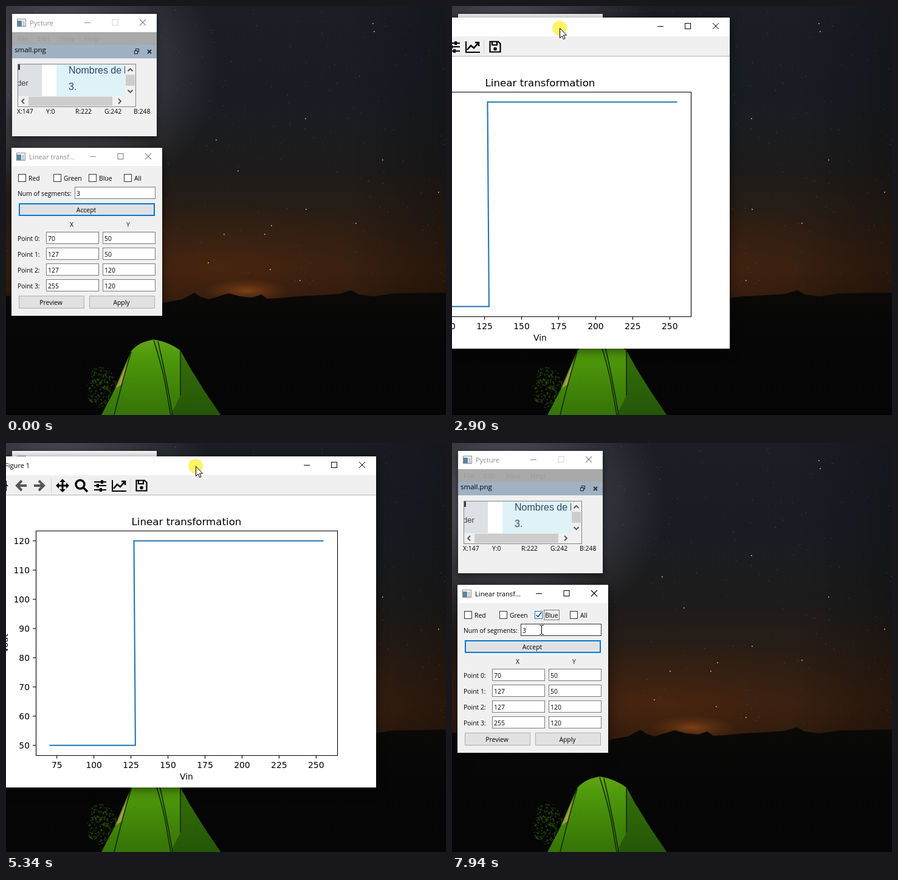
These frames come from a looping animation (724x672 px, 8 s). An HTML page with a canvas:

```html
<!DOCTYPE html>
<html lang="en">
<head>
<meta charset="utf-8">
<title>Linear transformation</title>
<style>
html, body { margin: 0; width: 100%; height: 100%; overflow: hidden; background: #060606; }
canvas { display: block; }
</style>
</head>
<body>
<canvas id="stage" width="724" height="672"></canvas>
<script>
const LOOP = 8000;
const stage = document.getElementById('stage').getContext('2d');
let c = stage;

// ---------- helpers ----------
const ramp = (t, a, b) => Math.min(1, Math.max(0, (t - a) / (b - a)));
const within = (t, a, b) => t >= a && t < b;

function layer(w, h, draw) {
  const canvas = document.createElement('canvas');
  canvas.width = w;
  canvas.height = h;
  c = canvas.getContext('2d');
  draw();
  c = stage;
  return canvas;
}

function rect(x, y, w, h, fill) {
  c.fillStyle = fill;
  c.fillRect(x, y, w, h);
}

function box(x, y, w, h, fill, edge, lw = 1) {
  rect(x, y, w, h, edge);
  rect(x + lw, y + lw, w - 2 * lw, h - 2 * lw, fill);
}

function text(s, x, y, size = 10.4, color = '#000', align = 'left', font = '"Open Sans"') {
  c.font = `${size}px ${font}, sans-serif`;
  c.fillStyle = color;
  c.textAlign = align;
  c.fillText(s, x, y);
}

function path(d, x, y, { fill, stroke, lw = 1 }) {
  const p = new Path2D(d);
  c.save();
  c.translate(x, y);
  if (fill) { c.fillStyle = fill; c.fill(p); }
  if (stroke) { c.strokeStyle = stroke; c.lineWidth = lw; c.stroke(p); }
  c.restore();
}

function dot(x, y, r, fill) {
  c.fillStyle = fill;
  c.beginPath();
  c.arc(x, y, r, 0, 7);
  c.fill();
}

function shadowed(x, y, w, h, blur) {
  c.save();
  c.shadowColor = 'rgba(0,0,0,.6)';
  c.shadowBlur = blur;
  c.shadowOffsetY = 3;
  rect(x, y, w, h, '#f0f0f0');
  c.restore();
}

// ---------- night photo ----------
let seed = 11;
const rnd = () => (seed = (seed * 16807) % 2147483647) / 2147483647;

function linear(x0, y0, x1, y1, ...stops) {
  const g = c.createLinearGradient(x0, y0, x1, y1);
  stops.forEach(([at, color]) => g.addColorStop(at, color));
  return g;
}

function glow(x, y, rx, ry, rgb, alpha) {
  c.save();
  c.translate(x, y);
  c.scale(rx, ry);
  const g = c.createRadialGradient(0, 0, 0, 0, 0, 1);
  g.addColorStop(0, `rgba(${rgb},${alpha})`);
  g.addColorStop(0.5, `rgba(${rgb},${alpha * 0.4})`);
  g.addColorStop(1, `rgba(${rgb},0)`);
  rect(-1, -1, 2, 2, g);
  c.restore();
}

const photo = layer(724, 672, () => {
  rect(0, 0, 724, 672, linear(0, 0, 0, 490, [0, '#1b1e25'], [0.3, '#191d23'], [0.56, '#1e1c1b'],
    [0.72, '#2a1d14'], [0.88, '#351e10'], [1, '#2c190d']));
  glow(90, 100, 260, 230, '135,128,140', 0.75);
  glow(350, 430, 330, 110, '100,48,14', 0.4);
  glow(396, 468, 70, 20, '165,82,26', 0.6);
  rect(560, 0, 164, 480, linear(560, 0, 724, 0, [0, 'rgba(0,0,0,0)'], [1, 'rgba(0,0,0,.25)']));

  for (let i = 0; i < 330; i++) {
    const y = rnd() * 460;
    rect(rnd() * 724, y, 1, 1, `rgba(190,195,205,${0.1 + rnd() * 0.35})`);
  }
  [[605, 41], [603, 28], [345, 219], [381, 270], [493, 333], [436, 360], [425, 374], [332, 421],
   [711, 305], [483, 450], [575, 356], [619, 252], [358, 374], [492, 184], [434, 432]]
    .forEach(([x, y]) => rect(x, y, 1.6, 2, 'rgba(225,215,200,.75)'));

  path(`M0 476L257 488L290 482L310 471L320 478L334 482L350 477L366 472L385 477L405 479L420 474
    L430 481L450 480L480 477L520 475L548 473L568 467L580 474L605 477L640 472L724 471V672H0Z`,
    0, 0, { fill: linear(0, 470, 0, 672, [0, '#0a0908'], [0.4, '#060606'], [1, '#040504']) });

  for (let i = 0; i < 230; i++) {
    const a = rnd() * 7, r = Math.sqrt(rnd());
    dot(157 + Math.cos(a) * r * 25, 626 + Math.sin(a) * r * 34, 0.6 + rnd(),
      `rgba(${30 + rnd() * 30},${60 + rnd() * 55},14,.6)`);
  }

  const shell = 'M157 672L178 632L190 603L206 567Q218 552 243 548Q268 552 287 566L301 592L326 632L353 672Z';
  path(shell, 0, 0, { fill: linear(0, 548, 0, 672, [0, '#62a514'], [0.25, '#4d980b'], [1, '#357307']) });
  path('M287 566L301 592L326 632L353 672H271L287 640Z', 0, 0,
    { fill: linear(0, 566, 0, 672, [0, '#35700a'], [1, '#245607']) });
  path('M204 575L181 628L192 620Z', 0, 0, { fill: '#a99a48' });
  path('M243 549Q256 590 262 620L271 672M250 551Q264 610 274 672M206 568Q193 610 178 672M287 566V640', 0, 0,
    { stroke: '#142a06', lw: 1.6 });
});

// ---------- plot window ----------
const FIG_W = 640, FIG_H = 544;
const px = v => 80 + (v - 60.75) * 496 / 203.5;
const py = v => 491.6 - (v - 46.5) * 4.8;
const CROSS = 'M-5-5L5 5M5-5L-5 5';

const figure = layer(FIG_W, FIG_H, () => {
  rect(0, 0, FIG_W, FIG_H, '#fff');
  rect(0, 31, FIG_W, 32, '#f0f0f0');
  rect(0, 63, FIG_W, 1, '#b4b4b4');
  dot(15, 15, 7, '#c2beb0');
  text('Figure 1', 29, 19, 11.1);
  rect(521, 14, 10, 1, '#000');
  box(566, 9, 10, 10, '#fff', '#000');
  path(CROSS, 617, 14, { stroke: '#000' });

  const ink = '#000', dim = '#55555a', y = 48;
  path('M-10 1L0-8L4-4V-8H7V-2L10 1H7V9H2V3H-2V9H-7V1Z', 25, y, { fill: ink });
  path('M1-8L-7 0L1 8M-7 0H9', 56, y, { stroke: dim, lw: 4 });
  path('M-1-8L7 0L-1 8M7 0H-9', 86, y, { stroke: dim, lw: 4 });
  path('M-8 0H8M0-8V8', 124, y, { stroke: ink, lw: 3 });
  path('M-11 0L-6-5V5ZM11 0L6-5V5ZM0-11L-5-6H5ZM0 11L-5 6H5Z', 124, y, { fill: ink });
  path('M5-2A7 7 0 1 1-9-2A7 7 0 1 1 5-2M3 3L10 10', 155, y, { stroke: ink, lw: 3.4 });
  path('M-10-6H10M-10 0H10M-10 7H10', 186, y, { stroke: ink, lw: 2 });
  path('M3-9V-3M-4-3V3M1 4V10', 186, y, { stroke: ink, lw: 4 });
  path('M-11-9V9H12', 217, y, { stroke: ink, lw: 2 });
  path('M-9 5L-3-2L2 2L9-6M4-7H10V-1', 217, y, { stroke: ink, lw: 2.6 });
  path('M-8.5-8.5H5L8.5-5V8.5H-8.5ZM-5-8V-3H3V-8', 254, y, { stroke: ink, lw: 2.2 });
  dot(254, 51.5, 2.8, ink);
  [105, 235].forEach(x => rect(x, 36, 1, 24, '#d4d4d4'));

  const font = '"DejaVu Sans"', size = 13.89;
  text('Linear transformation', 328, 113, 16.67, ink, 'center', font);
  for (let v = 75; v <= 250; v += 25) {
    path('M0 0V5', px(v), 491.6, { stroke: ink, lw: 1.1 });
    text(v, px(v), 512, size, ink, 'center', font);
  }
  for (let v = 50; v <= 120; v += 10) {
    path('M0 0H-5', 80, py(v), { stroke: ink, lw: 1.1 });
    text(v, 70, py(v) + 5, size, ink, 'right', font);
  }
  text('Vin', 328, 531, size, ink, 'center', font);
  c.save();
  c.translate(34, 307);
  c.rotate(-Math.PI / 2);
  text('Vout', 0, 0, size, ink, 'center', font);
  c.restore();
  path(`M${px(70)} ${py(50)}L${px(128)} ${py(50)}L${px(127)} ${py(120)}L${px(255)} ${py(120)}`, 0, 0,
    { stroke: '#1f77b4', lw: 2.08 });
  path('M80.5 122.5H576.5V491.5H80.5Z', 0, 0, { stroke: ink, lw: 1.1 });
});

// ---------- pointer ----------
const KEYS = [
  [0, 632, 690], [189, 632, 690], [190, 632, 660], [960, 100, 464], [1030, 100, 473], [1230, 98, 487],
  [2190, 98, 487], [2540, 92, 34], [2610, 92, 34], [3360, 347, 40], [3690, 347, 40], [3910, 580, 42],
  [4050, 580, 42], [4240, 600, 38], [4600, 600, 38], [4930, 379, 38], [5150, 379, 38], [5260, 330, 39],
  [5340, 312, 38], [5680, -340, 36], [6270, -340, 36], [6275, 12, 158], [6290, 12, 158], [6800, 148, 320],
  [7040, 153, 284], [7110, 153, 284], [7310, 142, 283], [7660, 142, 283], [7930, 147, 307], [LOOP, 147, 307]
];
const PRESSES = [[1790, 1860], [2600, 3690], [5255, 5680], [7590, 7660]];

function pointer(t) {
  const i = KEYS.findIndex(k => k[0] > t);
  const [t0, x0, y0] = KEYS[i - 1], [t1, x1, y1] = KEYS[i];
  const u = ramp(t, t0, t1), e = u * u * (3 - 2 * u);
  return { x: x0 + (x1 - x0) * e, y: y0 + (y1 - y0) * e };
}

// ---------- application windows ----------
function caption(title, x, y, ink, maxInk) {
  box(x, y, 15, 13, '#fff', '#85898c');
  rect(x + 1, y + 3, 7, 9, '#5b84a3');
  rect(x + 9, y + 3, 4, 9, '#c9ced2');
  return (tx, minX, gap) => {
    const mid = y + 6;
    text(title, tx, mid + 5, 11.2, ink);
    rect(minX, mid, 10, 1, ink);
    box(minX + gap, mid - 5, 10, 10, '#fff', maxInk);
    path(CROSS, minX + 2 * gap + 5, mid, { stroke: ink, lw: 1.1 });
  };
}

function viewer() {
  shadowed(10, 13, 238, 201, 10);
  rect(10, 13, 238, 30, '#fff');
  caption('Pycture', 18, 21, '#8a8a8a', '#d2d2d2')(39, 129, 45.5);
  rect(10, 43, 238, 21, '#a8a9a8');
  [['File', 19], ['Edit', 52], ['View', 88], ['Help', 129]].forEach(([s, x]) => text(s, x, 58, 11.2, '#9a9b9a'));
  rect(10, 64, 238, 22, '#9fb1c2');
  text('small.png', 14, 76, 11.5);
  box(213, 70, 6, 6, '#9fb1c2', '#222');
  box(211, 73, 6, 6, '#9fb1c2', '#222');
  path('M-3-3L3 3M3-3L-3 3', 236, 75, { stroke: '#333', lw: 2 });

  box(19, 95, 195, 71, '#f0f0f0', '#828282');
  c.save();
  c.beginPath();
  c.rect(20, 96, 176, 52);
  c.clip();
  rect(20, 96, 39, 52, '#dde0e4');
  rect(59, 96, 24, 52, '#fff');
  rect(83, 96, 113, 52, '#def2f8');
  rect(20, 96, 3, 9, '#38404c');
  text('der', 18, 131, 13, '#3b3f46', 'left', '"Liberation Sans"');
  text('Nombres de', 103, 111, 16, '#30476a', 'left', '"Liberation Sans"');
  text('3.', 103, 138, 16, '#30476a', 'left', '"Liberation Sans"');
  rect(195, 99, 1, 12, '#30476a');
  c.restore();
  rect(197, 113, 15, 18, '#cdcdcd');
  rect(37, 149, 138, 15, '#cdcdcd');
  const arrow = { stroke: '#505050', lw: 1.8 };
  path('M-4 2L0-2L4 2', 204.5, 105, arrow);
  path('M-4-2L0 2L4-2', 204.5, 140, arrow);
  path('M2-4L-2 0L2 4', 28, 156.5, arrow);
  path('M-2-4L2 0L-2 4', 187, 156.5, arrow);
  ['X:147', 'Y:0', 'R:222', 'G:242', 'B:248'].forEach((s, i) => text(s, 18 + 48 * i, 177));
}

const FIELDS = [[113, 297, 133, '3']];
[[70, 50], [127, 50], [127, 120], [255, 120]].forEach((p, i) =>
  p.forEach((v, j) => FIELDS.push([66 + 93 * j, 371 + 26 * i, 87, v])));
const over = (p, x, y, w, h) => within(p.x, x, x + w) && within(p.y, y, y + h);

function button(s, x, y, w, hot, focus) {
  box(x, y, w, 21, '#e1e1e1', '#adadad');
  c.globalAlpha = Math.max(hot, focus);
  if (hot) box(x, y, w, 21, '#e5f1fb', '#0078d7');
  if (focus) box(x, y, w, 21, '#e1e1e1', '#0078d7', 2);
  c.globalAlpha = 1;
  text(s, x + w / 2 - 1, y + 15, 10.4, '#000', 'center');
}

function dialog(t, p, free) {
  const active = t >= 7590;
  const ink = active ? '#000' : '#8a8a8a';
  shadowed(9, 233, 248, 276, active ? 18 : 10);
  rect(9, 233, 248, 30, '#fff');
  caption('Linear transf...', 17, 241, ink, active ? '#000' : '#777')(38, 138, 45.5);

  ['Red', 'Green', 'Blue', 'All'].forEach((s, i) => {
    const x = 20 + 58 * i;
    const hot = free && over(p, x, 276, 36, 13);
    box(x, 276, 13, 13, '#fff', hot || (active && i === 2) ? '#0078d7' : '#333');
    text(s, x + 17, 287);
  });
  if (active) {
    path('M-4 0L-1 3L4.5-4', 142.5, 282.5, { stroke: '#222', lw: 1.3 });
    c.setLineDash([1, 1]);
    path('M151.5 274.5H176.5V290.5H151.5Z', 0, 0, { stroke: '#000' });
    c.setLineDash([]);
  }

  text('Num of segments:', 19, 312);
  text('X', 108, 363, 10.4, '#000', 'center');
  text('Y', 201, 363, 10.4, '#0a3010', 'center');
  for (let i = 0; i < 4; i++) text(`Point ${i}:`, 19, 386 + 26 * i);
  FIELDS.forEach(([x, y, w, s]) => {
    box(x, y, w, 20, '#fff', free && over(p, x, y, w, 20) ? '#333' : '#7a7a7a');
    text(s, x + 3, y + 15);
  });
  button('Accept', 21, 324, 224, 0, active ? ramp(t, 7590, 7700) : 1 - ramp(t, 190, 400));
  button('Preview', 21, 476, 108, t < 2400 ? ramp(t, 1020, 1230) : 0, 0);
  button('Apply', 137, 476, 108, 0, 0);
}

function plot(t, p) {
  let x = -13, y = 23;
  if (t < 2610) { x = -268; y = 17; }
  else if (t < 3690) { x += p.x - 347; y += p.y - 40; }
  else if (t > 5260) { x += p.x - 330; y += p.y - 39; }
  x = Math.round(x);
  y = Math.round(y);

  const shown = 1 - (1 - ramp(t, 1940, 2200)) ** 3;
  const k = 0.93 + 0.07 * shown;
  c.save();
  c.globalAlpha = shown;
  if (shown === 1) {
    c.shadowColor = 'rgba(0,0,0,.6)';
    c.shadowBlur = 18;
    c.shadowOffsetY = 3;
  }
  c.drawImage(figure, x + FIG_W * (1 - k) / 2, y + FIG_H * (1 - k) / 2, FIG_W * k, FIG_H * k);
  c.restore();

  if (within(t, 3880, 4100)) {
    rect(x + 548, y, 46, 30, '#e5e5e5');
    box(x + 566, y + 9, 10, 10, '#e5e5e5', '#000');
  }
  const red = ramp(t, 4095, 4170) * (1 - ramp(t, 4640, 4800));
  if (red) {
    c.globalAlpha = red;
    rect(x + 594, y, 46, 30, '#e81123');
    path(CROSS, x + 617, y + 14, { stroke: '#fff' });
    c.globalAlpha = 1;
  }
}

function cursor(t, p, free) {
  if (PRESSES.some(([a, b]) => within(t, a, b))) dot(p.x, p.y, 12, 'rgba(255,236,0,.6)');
  const x = Math.round(p.x), y = Math.round(p.y);
  if (free && FIELDS.some(([fx, fy, w]) => over(p, fx, fy, w, 20))) {
    path('M-3-7.5H0M1-7.5H4M.5-7V7M-3 7.5H0M1 7.5H4', x, y, { stroke: '#000' });
  } else {
    path('M.5.5V16.5L4 13L6.5 18.5L9 17.5L6.5 12H11.5Z', x, y, { fill: '#fff', stroke: '#000' });
  }
}

function draw(now) {
  const t = now % LOOP;
  const p = pointer(t);
  const plotOpen = within(t, 1940, 5680);
  c.drawImage(photo, 0, 0);
  viewer();
  dialog(t, p, !plotOpen);
  if (plotOpen) plot(t, p);
  cursor(t, p, !plotOpen);
}

let start;
function tick(now) {
  start ??= now;
  draw(now - start);
  requestAnimationFrame(tick);
}
requestAnimationFrame(tick);
</script>
</body>
</html>
```
